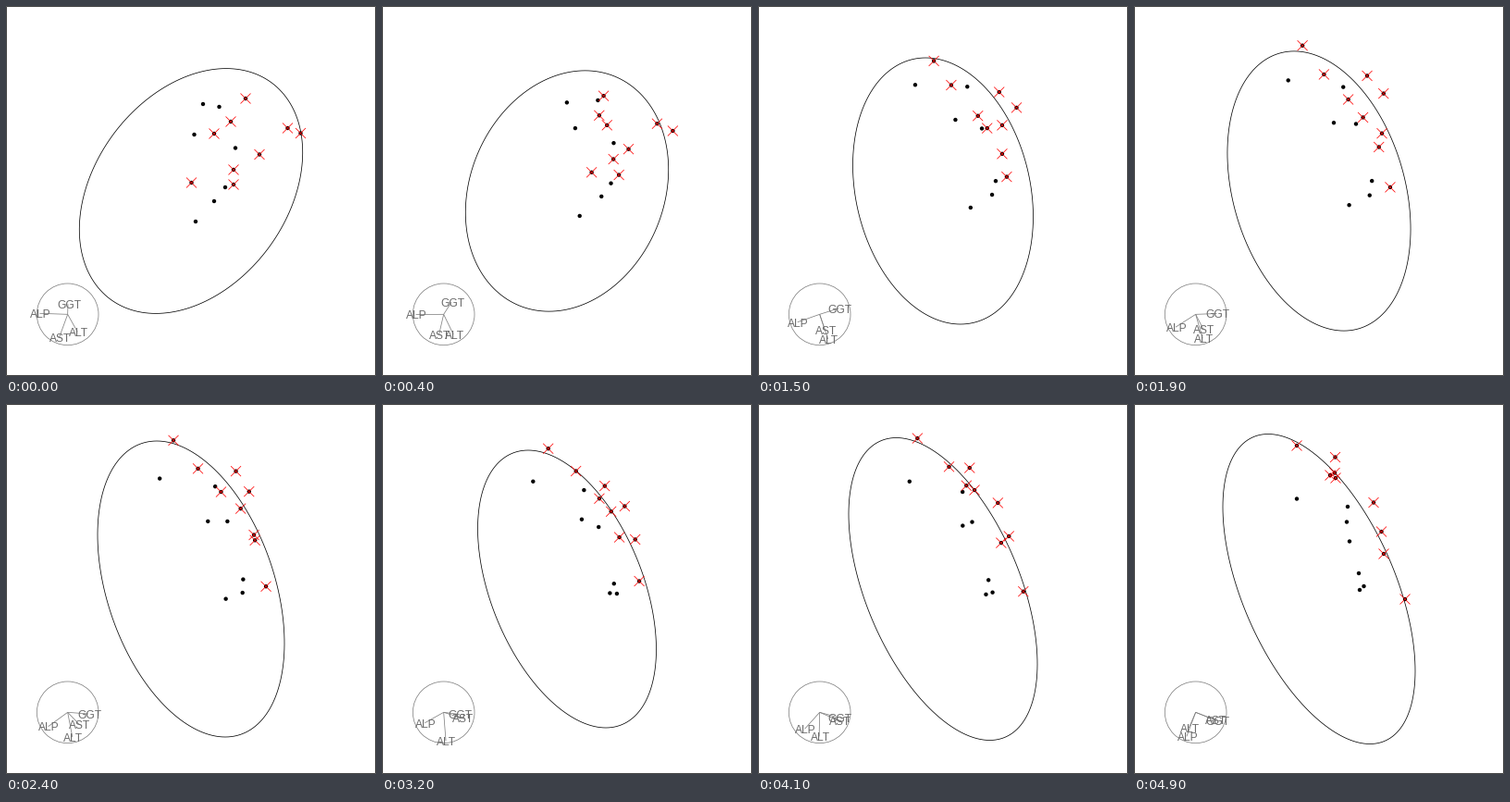
A matplotlib script that plays this animation: 400x400 px, repeating every 5 s.

```python
import numpy as np
import matplotlib.pyplot as plt
from matplotlib.animation import FuncAnimation
from matplotlib.collections import LineCollection, PolyCollection
from matplotlib.patches import Circle, Polygon, Rectangle

SIZE, DPI, FRAMES, INTERVAL = 400, 100, 50, 100
PX = 72 / DPI
THIN = 0.75 * PX
CENTRE = np.array([SIZE / 2, SIZE / 2])
DIAL, RADIUS = np.array([SIZE / 6, SIZE * 5 / 6]), SIZE / 12
FLIP = np.array([1, -1])
GREY, TEXT_GREY = "#7f7f7f", "#6b6b6b"
LABELS = ["GGT", "ALP", "AST", "ALT"]

# The tour's turning points: frame and the axis tips on the dial (y up).
TURNS = {
    0: [(0.3, 11.1), (-30.7, 1.1), (-9.2, -24.9), (10.8, -18.9)],
    9: [(17.3, 15.2), (-26.7, -0.8), (1.3, -16.8), (9.8, -24.8)],
    21: [(24.4, -2), (-21.1, -16.3), (9.4, -15), (6.9, -25.5)],
    32: [(17.3, -1.9), (-20.7, -11.9), (19.8, -5.9), (1.8, -30.9)],
    41: [(20.3, -5.4), (-16.2, -17.9), (20.8, -8.9), (-0.7, -25.9)],
    49: [(22.3, -8.4), (-10.2, -25.9), (21.3, -7.9), (-7.7, -16.9)],
}

# Where each sample stands in the opening and the closing view.
NORMAL = [
    (213, 106, 176, 102.5), (230.5, 109, 231, 111), (203.5, 139, 233, 148.5),
    (248, 153.5, 230, 127.5), (237, 196, 243, 183), (225, 211, 248.5, 197),
    (205, 233, 244, 201),
]
OUTLIERS = [
    (259, 100, 176, 45), (243, 125, 212, 77), (304.5, 132, 217.5, 57.5),
    (318.5, 137.5, 217, 74.5), (274, 160.5, 218, 80), (246, 177, 259, 106.5),
    (225, 138, 270, 162), (246, 193, 267.5, 138), (200.5, 191, 293, 211),
]

# Ellipse over time: half width, half height, sideways shift of its top.
ELLIPSE_TIMES = [0, 9, 15, 24, 32, 41, 49]
HALF_WIDTH = [120.7, 96, 97.5, 101, 96.5, 102, 104]
HALF_HEIGHT = [132.4, 127.3, 144, 160, 150, 163.5, 167.5]
LEAN = [38, -3.5, -18.8, -37, -42, -50.5, -55]


def polar(matrix):
    """Nearest matrix with orthonormal rows."""
    u, _, vt = np.linalg.svd(matrix, full_matrices=False)
    return u @ vt


TIMES = list(TURNS)
BASES = [polar(np.array(tips).T) for tips in TURNS.values()]

# Both end views together determine the four-dimensional samples.
seen = np.array(NORMAL + OUTLIERS).reshape(-1, 2, 2)
planes = ((seen - CENTRE) * FLIP).reshape(-1, 4)
samples = np.linalg.solve(np.vstack([BASES[0], BASES[-1]]), planes.T).T


def basis_at(frame):
    """Rotate steadily from one turning point of the tour to the next."""
    i = min(np.searchsorted(TIMES, frame, side="right"), len(TIMES) - 1)
    s = (frame - TIMES[i - 1]) / (TIMES[i] - TIMES[i - 1])
    return polar((1 - s) * BASES[i - 1] + s * BASES[i])


def ring(count):
    angle = np.linspace(0, 2 * np.pi, count, endpoint=False)
    return np.cos(angle), np.sin(angle)


def ellipse_at(frame):
    width, height, lean = (np.interp(frame, ELLIPSE_TIMES, values)
                           for values in (HALF_WIDTH, HALF_HEIGHT, LEAN))
    cos, sin = ring(180)
    x = lean * sin + np.sqrt(width**2 - lean**2) * cos
    return CENTRE + np.column_stack([x, -height * sin])


ARM = 5.5
DISC = 2.2 * np.column_stack(ring(24))
STROKES = ARM * np.array([[(-1, -1), (1, 1)], [(-1, 1), (1, -1)]])

fig = plt.figure(figsize=(SIZE / DPI, SIZE / DPI), dpi=DPI, facecolor="white")
ax = fig.add_axes([0, 0, 1, 1])
ax.set(xlim=(0, SIZE), ylim=(SIZE, 0))
ax.axis("off")
ax.add_patch(Rectangle((0.5, 0.5), SIZE - 1, SIZE - 1, fill=False,
                       ec="#444444", lw=PX, snap=False))
ax.add_patch(Circle(DIAL, RADIUS, fill=False, ec=GREY, lw=THIN))

spokes = ax.add_collection(LineCollection([], colors=GREY, linewidths=THIN))
names = [ax.text(0, 0, label, color=TEXT_GREY, size=12 * PX, ha="center",
                 va="baseline", family="Liberation Sans") for label in LABELS]
ellipse = ax.add_patch(Polygon(ellipse_at(0), fill=False, ec="black", lw=THIN))
dots = ax.add_collection(PolyCollection([], facecolors="black", linewidths=0,
                                        zorder=3))
crosses = ax.add_collection(LineCollection([], colors="red", linewidths=THIN,
                                           zorder=4))


def draw(frame):
    basis = basis_at(frame)
    tips = DIAL + RADIUS * basis.T * FLIP
    spokes.set_segments([(DIAL, tip) for tip in tips])
    for name, tip in zip(names, tips):
        name.set_position(tip + (1, 4.8))
    points = CENTRE + samples @ basis.T * FLIP
    dots.set_verts(points[:, None] + DISC)
    marked = points[len(NORMAL):, None, None]
    crosses.set_segments((marked + STROKES).reshape(-1, 2, 2))
    ellipse.set_xy(ellipse_at(frame))
    return [spokes, *names, ellipse, dots, crosses]


animation = FuncAnimation(fig, draw, frames=FRAMES, interval=INTERVAL,
                          repeat=True, repeat_delay=0)
plt.show()
```
